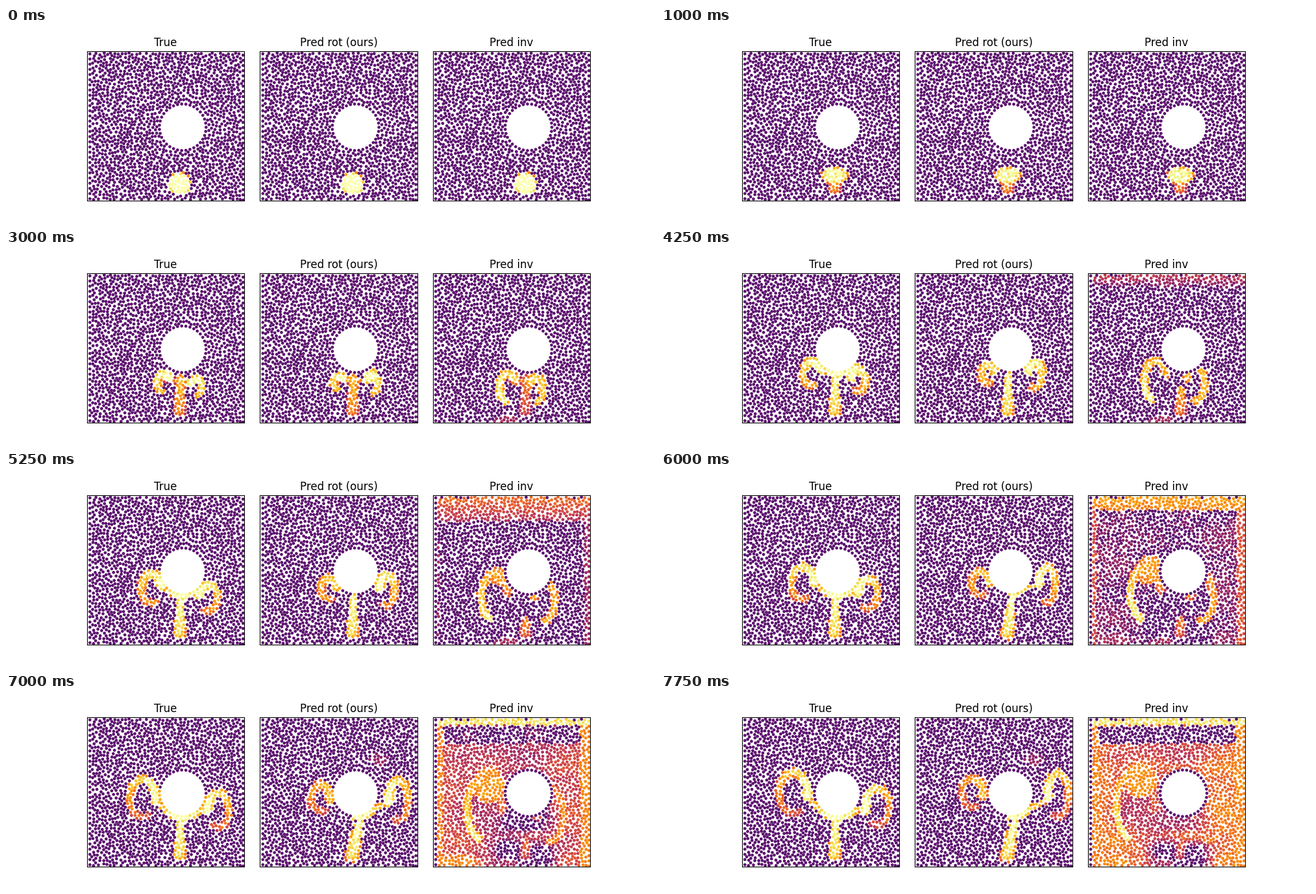
Write a matplotlib script that moves like this. It is 1000 px wide and 300 px high and loops after 8000 ms.

```python
import numpy as np
import matplotlib.pyplot as plt
from matplotlib.animation import FuncAnimation

STEP_MS, STEPS = 250, 32
LEFT, RIGHT, TOP, BOTTOM = 125, 367.2, 36, 267
CX, CY, RADIUS = 272.3, 153.5, 36      # cylinder
SOURCE_X, SOURCE_Y = 267.5, 241        # where the smoke starts
CALM, VISIBLE = 0.265, 0.35

rng = np.random.default_rng(7)


def make_nodes(gap=4.3, tries=30000):
    """Even random nodes around the cylinder, with regular wall nodes."""
    a = np.linspace(0, 2 * np.pi, 35, endpoint=False)
    wall = np.arange(40, 266, 8.0)
    fixed = np.concatenate([
        np.c_[CX + RADIUS * np.cos(a), CY + RADIUS * np.sin(a)],
        np.c_[np.full(wall.size, 129.3), wall],
        np.c_[np.full(wall.size, 365.3), wall + 2]])
    nodes = np.zeros((4000, 2))
    n = len(fixed)
    nodes[:n] = fixed
    for p in rng.uniform((129, 38.5), (365.5, 265.5), (tries, 2)):
        if np.hypot(p[0] - CX, p[1] - CY) < RADIUS:
            continue
        if ((nodes[:n] - p) ** 2).sum(1).min() > gap ** 2:
            nodes[n] = p
            n += 1
    return nodes[:n]


X, Y = make_nodes().T
GRAIN = rng.uniform(-1, 1, len(X))
FROM_CYLINDER = np.hypot(X - CX, Y - CY)


def ramp(t, start, end):
    return np.clip((t - start) / (end - start), 0, 1)


def ellipse(x, y, rx, ry, value, fade=0.4):
    """A filled ellipse whose value drops towards its rim."""
    d = np.hypot((X - x) / max(rx, 0.1), (Y - y) / max(ry, 0.1))
    return np.where(d < 1, value - fade * d ** 6, 0)


def stroke(path, width, value, fade=0.2):
    """A thick line; width and value are (start, end) pairs."""
    length = np.r_[0, np.cumsum(np.hypot(*np.diff(path, axis=0).T))]
    u = np.linspace(0, 1, 40)
    px, py = (np.interp(u * length[-1], length, c) for c in np.transpose(path))
    d2 = (X[:, None] - px) ** 2 + (Y[:, None] - py) ** 2
    share = u[d2.argmin(1)]
    d = np.sqrt(d2.min(1)) / np.interp(share, (0, 1), width)
    return np.where(d < 1, np.interp(share, (0, 1), value) - fade * d ** 2, 0)


def curl_path(t, drift_x, rise, grow_x, grow_y, turn):
    """Half of the smoke ring: an arc drifting and growing steadily."""
    a = np.radians(np.linspace(60 - 9 * t, min(130 + 42 * t, turn), 40))
    side = np.sign(drift_x)
    return np.c_[
        SOURCE_X + drift_x * t - side * (3 + grow_x * t) * np.cos(a),
        SOURCE_Y - 3 - rise * t - (2.5 + grow_y * t) * np.sin(a)]


def curl(t, drift_x, rise, grow_x, grow_y, head=1.04, tail=-0.05, turn=295):
    """Head is the first value, tail its change per second at the far end."""
    path = curl_path(t, drift_x, rise, grow_x, grow_y, turn)
    w = min(1 + 5 * t, 7)
    return stroke(path, (1.1 * w, 0.85 * w), (head, 1 + tail * t))


def wall_link(t, width, *motion):
    """Smoke clinging to the cylinder between the stem and a curl."""
    if width <= 0:
        return np.zeros(len(X))
    a = np.radians(np.linspace(0, 50, 12))
    wall = np.c_[CX + np.sign(motion[0]) * 38 * np.sin(a), CY + 38 * np.cos(a)]
    path = np.r_[wall, curl_path(t, *motion, 295)[:1]]
    return stroke(path, (width, width), (1.08, 0.8))


def core(t):
    """The round puff, flattening as it rises."""
    return ellipse(SOURCE_X, SOURCE_Y - 13 * t, 18.5 + 4 * t,
                   18.5 * (1 - t / 4.25), 1.1 - 0.13 * t)


def stem(t, top_y=191, lean=0.0, swell=0.0, glow=1.0):
    if t == 0:
        return np.zeros(len(X))
    top = (SOURCE_X + 1 + lean, max(SOURCE_Y - 14 * t, top_y))
    value = 1.08 * glow - 0.36 * np.exp(-((t - 2) / 1.2) ** 2)
    taper = 9 - 4.5 * ramp(t, 2, 4.25)
    return stroke([top, (SOURCE_X, 249)], (taper, 11 + swell),
                  (value, value - 0.18), fade=0.25)


def true_field(t):
    left, right = (-8.2, 11, 2.45, 3.8), (8.5, 8.3, 2, 3.4)
    width = 5 * ramp(t, 3, 4.25)
    return np.maximum.reduce([
        core(t), stem(t), curl(t, *left), curl(t, *right),
        wall_link(t, width, *left), wall_link(t, width, *right)])


def rot_field(t):
    left, right = (-7, 11, 1.7, 2.6), (10.1, 10.5, 1.7, 4.1)
    lean = ramp(t, 5.25, 6.5)
    return np.maximum.reduce([
        core(t), stem(t, 193, 10 * lean, 2 * lean),
        curl(t, *left, head=1.04 - 0.02 * t), curl(t, *right),
        wall_link(t, 5 * lean, *right),
        ellipse(310, 102, 17, 11, 0.39 * lean, 0.05)])


def dent(x, y, rx, ry, depth):
    return depth * np.exp(-(((X - x) / rx) ** 4 + ((Y - y) / ry) ** 4))


def false_background(t):
    """Error that enters at the walls, then fills the whole panel."""
    grown, late = ramp(t, 5.25, 6.5), ramp(t, 6.5, 7.75)
    b = 0.22 + 0.22 * grown + 0.21 * late
    b = b + 0.1 * grown * (np.abs(X - 246) / 121 - 0.4)
    b += 0.05 * grown * np.sin(X / 17 + 1) * np.sin(Y / 13)
    for x in (150, 330):
        b -= dent(x, 58, 24, 13, 0.2 * (grown - late))
    b -= dent(SOURCE_X, 194, 44, 20, 0.26 * grown - 0.08 * late)
    b -= dent(SOURCE_X, 252, 48, 24, 0.22 * grown + 0.2 * late)
    b -= dent(198, 165, 38, 50, 0.17 * late)
    b -= dent(246, 90, 110, 16, 0.1 * late)
    slab = (np.abs(X - 249) < 110) & (np.abs(Y - 63) < 14)
    b -= 0.5 * late * slab

    depth = 40 * ramp(t, 3, 5.25) - 28 * grown
    crest = min(0.37 + 0.145 * (t - 3), 0.92)
    down = Y - TOP
    band = np.where(down < depth,
                    crest - 0.22 * (1 - grown) * down / max(depth, 1), 0)
    from_side = np.minimum(X - LEFT, RIGHT - X)
    edge = 0.22 + 0.2 * ramp(t, 4.25, 5.25) + 0.31 * grown
    sides = np.where(from_side < 9 + 6 * grown, edge, 0)
    corner = ellipse(150, 262, 50, 16, 0.72 * grown, 0.1)
    b = np.maximum.reduce([b, band, sides, corner])
    still = (X < 130.5) | (FROM_CYLINDER < 39) | ((Y < 40.5) & (GRAIN > 0.2))
    return np.where(still, 0, b)


def inv_field(t):
    left, right = (-9, 8.5, 3.4, 6.5), (5.5, 7.3, 2.5, 5.5)
    fill = 26 * ramp(t, 4, 6.5)
    sunk = 37 * ramp(t, 3, 5.25)
    spill = 0.45 * ramp(t, 2, 3)
    smoke = np.maximum.reduce([
        core(t), stem(t, 191 + sunk, glow=1 - 0.045 * t),
        curl(t, *left, head=1.04 - 0.055 * t, tail=0, turn=250),
        curl(t, *right, head=1.04 - 0.05 * t, tail=-0.03, turn=275),
        ellipse(SOURCE_X - 8 * t, 218 - 11 * t, fill, 1.1 * fill, 0.76, 0.08)])
    smoke = np.where((FROM_CYLINDER < 37) & (t > 3), 0, smoke)
    return np.maximum.reduce([smoke, false_background(t),
                              ellipse(238, 263, 20, 7, spill, 0.08)])


def shade(field, t):
    value = field(t) + 0.045 * GRAIN
    return np.where(value < VISIBLE, CALM, np.clip(value, 0, 1))


fig, axes = plt.subplots(1, 3, figsize=(10, 3), dpi=100)
fig.subplots_adjust(left=0.125, right=0.9, bottom=0.11, top=0.88, wspace=0.1)

panels = []
for ax, title, field in zip(axes, ("True", "Pred rot (ours)", "Pred inv"),
                            (true_field, rot_field, inv_field)):
    dots = ax.scatter(X, Y, c=shade(field, 0), s=11.5, linewidths=0,
                      cmap="inferno", vmin=0, vmax=1)
    ax.set(title=title, xticks=[], yticks=[],
           xlim=(LEFT, RIGHT), ylim=(BOTTOM, TOP))
    panels.append((dots, field))


def draw(step):
    seconds = step * STEP_MS / 1000
    for dots, field in panels:
        dots.set_array(shade(field, seconds))
    return [dots for dots, _ in panels]


animation = FuncAnimation(fig, draw, frames=STEPS, interval=STEP_MS,
                          repeat=True, repeat_delay=0)
plt.show()
```
